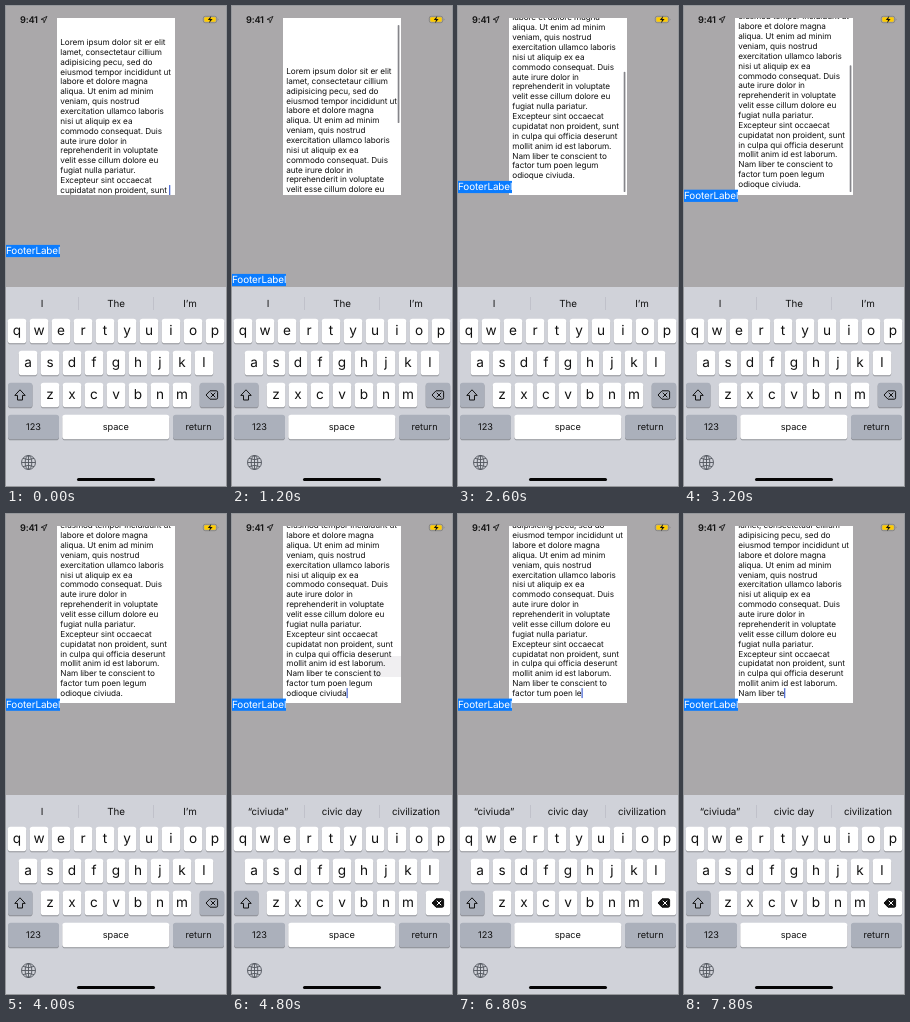
Recreate the animation shown at these times as an HTML page. Size 220 by 480 pixels, loop 8 s.

```html
<!DOCTYPE html>
<html lang="en">
<head>
<meta charset="utf-8">
<title>Text view with footer</title>
<style>
  html, body { margin: 0; width: 100%; height: 100%; overflow: hidden; background: #aaa8aa; }
  svg { display: block; width: 100vw; height: 100vh; }
  text { font-family: Inter, Roboto, sans-serif; fill: #111; text-rendering: geometricPrecision; white-space: pre; }
  .mid { text-anchor: middle; }
  .body text { font-size: 8.2px; letter-spacing: -0.08px; }
</style>
</head>
<body>
<svg id="stage" viewBox="0 0 220 480">
  <defs><clipPath id="view"><rect x="51" y="12" width="118" height="177"/></clipPath></defs>
  <rect width="220" height="480" fill="#aaa8aa"/>

  <text x="14" y="17.2" font-size="9.2" font-weight="600" letter-spacing="-.2">9:41</text>
  <path d="M41 10.4 35 13.4 37.8 13.8 38 16.8Z" fill="none" stroke="#222" stroke-width=".9" stroke-linejoin="round"/>
  <rect x="197.3" y="10.3" width="13.4" height="6.4" rx="1.9" fill="none" stroke="#7c7a76" stroke-width=".7"/>
  <rect x="198.3" y="11.3" width="11.4" height="4.4" rx="1" fill="#fc0"/>
  <path d="M211.8 12.3q1.4 1.2 0 2.4z" fill="#7c7a76"/>
  <path d="M205.3 9.8 201.8 14H204L203 17.2 206.6 13H204.3Z" fill="#111"/>

  <rect x="51" y="12" width="118" height="177" fill="#fff"/>
  <g class="body" clip-path="url(#view)">
    <rect id="menu" x="137" y="142" width="32" height="21" fill="#f0eff1"/>
    <g id="content"></g>
    <rect id="caret" width="1.2" height="10" fill="#4463d0"/>
    <rect id="bar" x="165.7" width="1.7" rx=".85" fill="#85858a"/>
  </g>

  <g id="footer">
    <rect width="54" height="12.2" fill="#0a7cff"/>
    <text x="0" y="9.6" font-size="9.9" letter-spacing="-.1" style="fill:#fff">FooterLabel</text>
  </g>

  <rect y="281" width="220" height="199" fill="#d0d2d9"/>
  <path d="M72.5 291V304M147.5 291V304" stroke="#b9bbc3" stroke-width=".7"/>
  <g id="hints"></g>
  <g id="keys"></g>
  <path d="M14 383.8 19.2 389.4H16.5V394H11.5V389.4H8.8Z" fill="none" stroke="#111" stroke-width="1" stroke-linejoin="round"/>
  <path id="erase" d="M204 384.8H210.2Q211.6 384.8 211.6 386.2V391.8Q211.6 393.2 210.2 393.2H204L200 389Z" stroke="#111" stroke-width="1" stroke-linejoin="round"/>
  <path id="cross" d="M205 387 209 391M209 387 205 391" stroke-width="1" stroke-linecap="round"/>
  <g fill="none" stroke="#50545c" stroke-width=".9">
    <circle cx="22.5" cy="456.5" r="7"/>
    <ellipse cx="22.5" cy="456.5" rx="3.3" ry="7"/>
    <path d="M22.5 449.5V463.5M15.5 456.5H29.5M17 452.4Q22.5 455 28 452.4M17 460.6Q22.5 458 28 460.6"/>
  </g>
  <rect x="71" y="472" width="78" height="3" rx="1.5" fill="#050505"/>
</svg>
<script>
const $ = id => document.getElementById(id);
const add = (parent, tag, attrs, text = '') => {
  const el = document.createElementNS('http://www.w3.org/2000/svg', tag);
  for (const k in attrs) el.setAttribute(k, attrs[k]);
  el.textContent = text;
  return parent.appendChild(el);
};
const set = (el, attrs) => { for (const k in attrs) el.setAttribute(k, attrs[k]); };

const LOOP = 8000, STEP = 200, PITCH = 9.87, LEFT = 54.3, MAX_WIDTH = 114;
const LINES = `Lorem ipsum dolor sit er elit
lamet, consectetaur cillium
adipisicing pecu, sed do
eiusmod tempor incididunt ut
labore et dolore magna
aliqua. Ut enim ad minim
veniam, quis nostrud
exercitation ullamco laboris
nisi ut aliquip ex ea
commodo consequat. Duis
aute irure dolor in
reprehenderit in voluptate
velit esse cillum dolore eu
fugiat nulla pariatur.
Excepteur sint occaecat
cupidatat non proident, sunt
in culpa qui officia deserunt
mollit anim id est laborum.
Nam liber te conscient to
factor tum poen legum
odioque civiuda.`;
const COUNT = LINES.split('\n').length;
const EDIT_LINE = 15;

// [time, centre of the first line]
const SCROLL = [[0, 36], [200, 36], [1200, 65], [1400, 58], [2000, -1.7], [2600, -28], [3200, -19.2], [3400, -18.3]];
// [time, characters removed] once whole words are deleted
const WORDS = [[7000, 23], [7200, 28], [7400, 32], [7600, 39], [7800, 52]];

// Keyboard
const key = (x, y, w, label, size, fill = '#fff') => {
  add($('keys'), 'rect', { x, y: y + 1, width: w, height: 24.5, rx: 2.8, fill: '#8c8e94' });
  const face = add($('keys'), 'rect', { x, y, width: w, height: 24.5, rx: 2.8, fill });
  const drop = size > 12 ? 16.4 : 15.6;
  add($('keys'), 'text', { class: 'mid', x: x + w / 2, y: y + drop, 'font-size': size }, label);
  return face;
};
const GRAY = '#abb0bb';
[['qwertyuiop', 11], ['asdfghjkl', 22], ['zxcvbnm', 44]].forEach(([letters, start], row) =>
  [...letters].forEach((c, i) => key(start + i * 22 - 9.25, 312.7 + row * 32, 18.5, c, 13.6)));
key(2, 376.7, 24.5, '', 9, GRAY);
const eraseKey = key(193.7, 376.7, 24.5, '', 9, GRAY);
key(2, 408.7, 51, '123', 9.2, GRAY);
key(56.3, 408.7, 107, 'space', 9.2);
key(167, 408.7, 51, 'return', 9.2, GRAY);

const hints = [36, 110, 184].map(x => add($('hints'), 'text', { class: 'mid', x, y: 300.6, 'font-size': 9.8, 'letter-spacing': -.05 }));
const rows = Array.from({ length: COUNT }, (_, i) => add($('content'), 'text', { x: LEFT, y: i * PITCH + 2.9 }));

const pen = document.createElement('canvas').getContext('2d');
const widthOf = s => {
  pen.font = '8.2px Inter, Roboto, sans-serif';
  return pen.measureText(s).width - .08 * s.length;
};

function scrollAt(t) {
  const i = SCROLL.findIndex(k => k[0] > t);
  if (i < 0) return SCROLL[SCROLL.length - 1][1];
  const [t0, a] = SCROLL[i - 1], [t1, b] = SCROLL[i];
  const p = (t - t0) / (t1 - t0);
  return a + (b - a) * p * p * (3 - 2 * p);
}

function removedAt(t) {
  if (t < 4600) return 0;
  if (t < 7000) return 1 + Math.round(Math.max(0, t - 4800) * 19 / 2000);
  return WORDS.filter(w => w[0] <= t).pop()[1];
}

// A shortened last word moves up as soon as it fits.
function linesAt(t) {
  const lines = LINES.slice(0, LINES.length - removedAt(t)).split('\n');
  const last = lines[lines.length - 1];
  if (!last.includes(' ')) {
    const joined = lines[lines.length - 2] + ' ' + last;
    if (widthOf(joined) < MAX_WIDTH) lines.splice(-2, 2, joined);
  }
  return lines;
}

function draw(t) {
  const lines = linesAt(t);
  const top = scrollAt(t) + (COUNT - lines.length) * PITCH;
  rows.forEach((row, i) => { row.textContent = lines[i] || ''; });
  $('content').setAttribute('transform', `translate(0 ${top})`);
  $('footer').setAttribute('transform', `translate(0 ${top + 202.9 - (COUNT - lines.length) * PITCH})`);

  const atEnd = t >= 4200;
  const caretLine = atEnd ? lines.length - 1 : EDIT_LINE;
  set($('caret'), {
    x: LEFT + widthOf(lines[caretLine] + (atEnd ? '' : ' ')),
    y: top + caretLine * PITCH - 5,
    opacity: t < 600 || atEnd ? 1 : 0
  });

  const barTop = Math.max(19, 46 - (top + 1.7) * .75);
  const barEnd = Math.min(186, barTop + 127 - Math.max(0, top - 36));
  set($('bar'), { y: barTop, height: barEnd - barTop, opacity: t < 400 || t > 3600 ? 0 : t > 3400 ? .4 : 1 });
  $('menu').setAttribute('opacity', t === 4800 ? 1 : 0);

  const deleting = t >= 4600;
  const words = deleting ? ['“civiuda”', 'civic day', 'civilization'] : ['I', 'The', 'I’m'];
  hints.forEach((h, i) => { h.textContent = words[i]; });
  eraseKey.setAttribute('fill', deleting ? '#fff' : GRAY);
  $('erase').setAttribute('fill', deleting ? '#111' : 'none');
  $('cross').setAttribute('stroke', deleting ? '#fff' : '#111');
}

const start = performance.now();
function tick() {
  const t = (performance.now() - start) % LOOP;
  draw(Math.floor(t / STEP) * STEP);
  requestAnimationFrame(tick);
}
tick();
</script>
</body>
</html>
```
